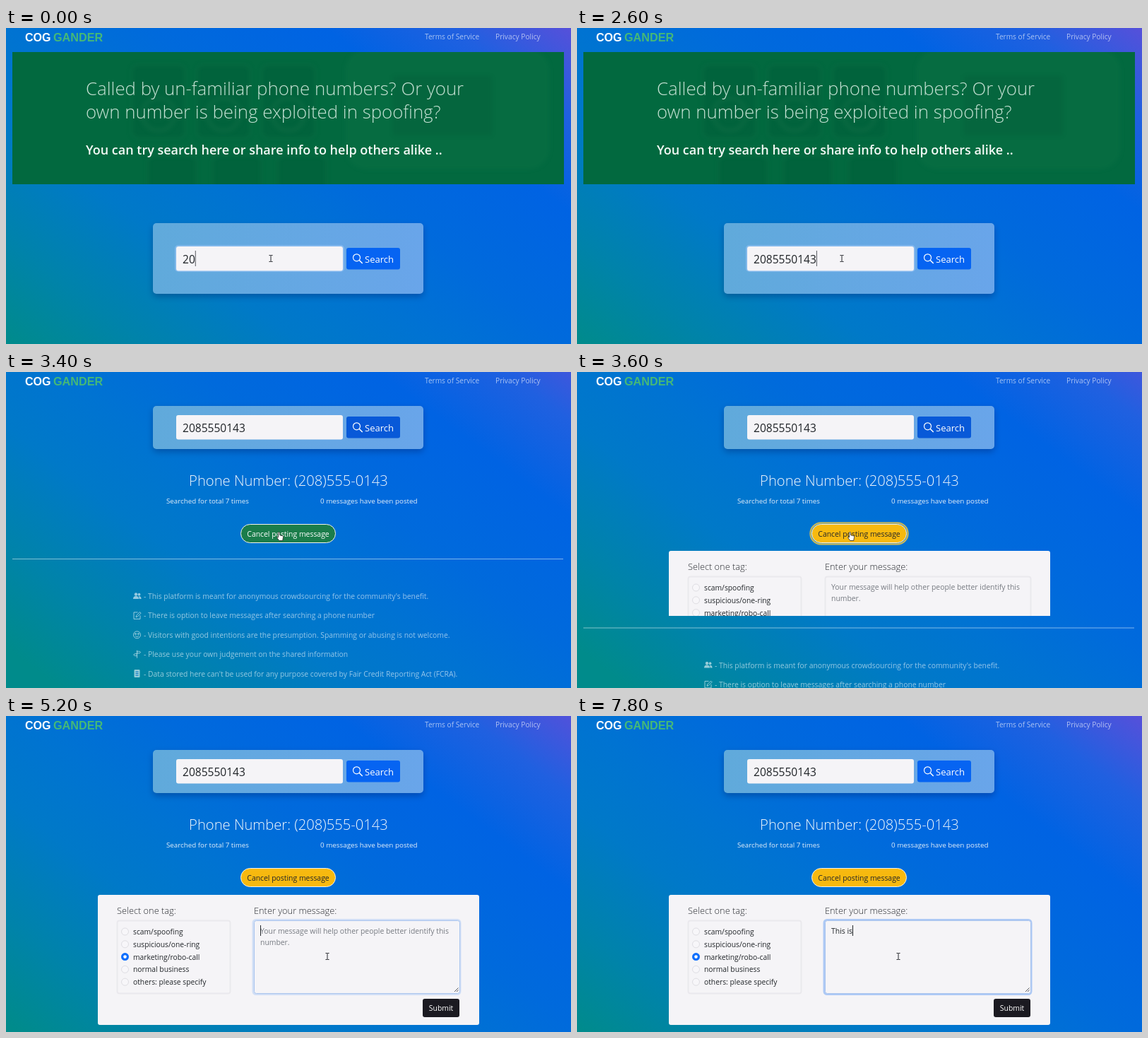
Recreate the animation shown at these times as an HTML page with a canvas. Size 800 by 447 pixels, loop 8 s.

```html
<!DOCTYPE html>
<html lang="en">
<head>
<meta charset="utf-8">
<title>Phone number search</title>
<style>
html, body { margin: 0; width: 100%; height: 100%; overflow: hidden; background: #006fd6; }
canvas { display: block; width: 800px; height: 447px; }
</style>
</head>
<body>
<canvas id="stage"></canvas>
<script>
const W = 800, H = 447, LOOP = 8000, STEP = 200;
const SANS = '"Open Sans", "Noto Sans", sans-serif';
const NUMBER = '2085550143', PRETTY = '(208)555-0143', MESSAGE = 'This is';
const INK = '#212529', PAPER = '#f5f4f7';
const RESULTS_AT = 2800, CLICK_AT = 3400;

const canvas = document.getElementById('stage');
const ctx = canvas.getContext('2d');
const dpr = window.devicePixelRatio || 1;
canvas.width = W * dpr;
canvas.height = H * dpr;

// Times at which each further character appears
const digitTimes = [0, 0, 200, 400, 600, 1000, 1200, 1800, 2000, 2200];
const letterTimes = [6400, 6600, 6800, 7000, 7200, 7600, 7800];

// Time, x, y, shape
const cursorPath = [
  [0, 375, 326, 'beam'],
  [2800, 0, 0, 'none'],
  [3000, 420, 286, 'arrow'],
  [3200, 388, 232, 'hand'],
  [3800, 340, 268, 'arrow'],
  [4000, 262, 336, 'arrow'],
  [4200, 225, 362, 'arrow'],
  [4400, 190, 348, 'arrow'],
  [4800, 170, 341, 'arrow'],
  [5000, 315, 341, 'arrow'],
  [5200, 455, 340, 'beam'],
];

const clamp = v => Math.max(0, Math.min(1, v));
const ease = v => { v = clamp(v); return v * v * (3 - 2 * v); };
const typed = (text, times, t) => text.slice(0, times.filter(k => k <= t).length);

function text(str, x, y, size, color = '#fff', weight = 400, align = 'left', family = SANS) {
  ctx.font = `${weight} ${size}px ${family}`;
  ctx.textAlign = align;
  ctx.fillStyle = color;
  ctx.fillText(str, x, y);
  return ctx.measureText(str).width;
}

function box(x, y, w, h, r, fill, stroke, line = 1) {
  ctx.beginPath();
  ctx.roundRect(x, y, w, h, r);
  if (fill) { ctx.fillStyle = fill; ctx.fill(); }
  if (stroke) { ctx.strokeStyle = stroke; ctx.lineWidth = line; ctx.stroke(); }
}

function disc(x, y, r, fill, stroke, line = 1) {
  ctx.beginPath();
  ctx.arc(x, y, r, 0, Math.PI * 2);
  if (fill) { ctx.fillStyle = fill; ctx.fill(); }
  if (stroke) { ctx.strokeStyle = stroke; ctx.lineWidth = line; ctx.stroke(); }
}

function path(d, stroke, line = 1, fill) {
  const p = new Path2D(d);
  if (fill) { ctx.fillStyle = fill; ctx.fill(p); }
  if (stroke) { ctx.strokeStyle = stroke; ctx.lineWidth = line; ctx.stroke(p); }
}

function at(x, y, draw) {
  ctx.save();
  ctx.translate(x, y);
  draw();
  ctx.restore();
}

function shadow(color, blur, dy, draw) {
  ctx.save();
  ctx.shadowColor = color;
  ctx.shadowBlur = blur * dpr;
  ctx.shadowOffsetY = dy * dpr;
  draw();
  ctx.restore();
}

function background(t) {
  const drift = t < RESULTS_AT ? 0 : 45 * (1 - ease((t - 3400) / 2600));
  // Runs from the lower left to the upper right, steeper than the diagonal
  const dx = 0.6, dy = -0.8, half = (W * dx - H * dy) / 2;
  const point = d => [W / 2 + dx * d, H / 2 + dy * d];
  const g = ctx.createLinearGradient(...point(drift - half), ...point(drift + half));
  [[0, '#008b8b'], [0.14, '#0083aa'], [0.3, '#0079c8'], [0.43, '#0073d2'],
   [0.57, '#006adc'], [0.75, '#0063e3'], [0.88, '#2060e0'], [1, '#5650da']].forEach(s => g.addColorStop(...s));
  ctx.fillStyle = g;
  ctx.fillRect(0, 0, W, H);
}

function header() {
  const arial = '"Liberation Sans", sans-serif';
  text('COG', 27, 19, 16, '#fff', 700, 'left', arial);
  text('GANDER', 67, 19, 16.2, '#45b878', 700, 'left', arial);
  text('Terms of Service', 593, 16, 10.15, 'rgba(255,255,255,.62)');
  text('Privacy Policy', 693, 16, 10.2, 'rgba(255,255,255,.62)');
}

function hero() {
  box(9, 34, 781, 187, 0, '#02693f');
  ctx.save();
  ctx.beginPath();
  ctx.rect(9, 34, 781, 187);
  ctx.clip();
  ctx.filter = 'blur(3px)';
  // Dim key caps behind the text
  const dark = 'rgba(0,50,35,.09)', pale = 'rgba(70,150,100,.13)';
  box(480, 30, 290, 170, 30, 'rgba(70,150,100,.07)');
  for (let i = 0; i < 3; i++) {
    box(178 + i * 92, 52, 76, 104, 8, dark, pale, 3);
    box(200 + i * 92, 180, 70, 50, 8, dark, pale, 3);
    disc(216 + i * 92, 122, 23, null, pale, 6);
  }
  box(548, 68, 140, 84, 4, dark);
  ctx.restore();

  const mint = '#c5e1d3';
  text('Called by un-familiar phone numbers? Or your', 113, 95, 25.84, mint, 300);
  text('own number is being exploited in spoofing?', 113, 128, 25.84, mint, 300);
  text('You can try search here or share info to help others alike ..', 113, 179, 18, '#f4faf6', 600);
}

function searchCard(y, h, inputY, value, focused, buttonColor) {
  const g = ctx.createLinearGradient(208, 0, 591, 0);
  g.addColorStop(0, '#60aadb');
  g.addColorStop(1, '#69a5ea');
  shadow('rgba(0,25,90,.35)', 10, 4, () => box(208, y, 383, h, 5, g));
  if (focused) box(240, inputY - 1, 238, 36, 4, null, 'rgba(150,195,245,.6)', 2);
  box(241, inputY, 236, 34.5, 3, PAPER);
  const w = text(value, 250, inputY + 24, 15.55, INK);
  if (focused) box(250 + w, inputY + 6, 1, 22, 0, '#55585e');
  box(482, inputY + 2, 76, 30.5, 3, buttonColor);
  disc(496.5, inputY + 15.8, 5, null, '#fff', 1.15);
  path(`M500.2 ${inputY + 19.5}l4.5 4.5`, '#fff', 1.5);
  text('Search', 508, inputY + 23, 13, '#fff');
}

const icons = [
  c => {
    disc(4, 3, 2.2, c);
    disc(8.5, 3.2, 1.9, c);
    path('M0 9.5q0-4 4-4t4 4zM8.6 9.5q0-2.4-1-3.8q4-.6 4 3.8z', null, 1, c);
  },
  c => path('M6.5 1H1v9.5h9V5.5M4 7.8l.6-2.2L9.5.6l1.6 1.6-5 5z', c),
  c => {
    disc(5.5, 5.5, 5, null, c);
    box(2, 3.2, 3, 2, 1, c);
    box(6, 3.2, 3, 2, 1, c);
    path('M3 7q2.5 2.5 5 0', c);
  },
  c => path('M5.5 0v11M5.5 1.5h3.6l1.5 1.3-1.5 1.3H5.5M5.5 5H2.2L.7 6.3l1.5 1.3h3.3', c),
  c => {
    box(1.5, 0, 8, 11, 1, c);
    path('M3.5 3h4M3.5 5.5h4M3.5 8h4', '#0074c4');
  },
];

const notes = [
  "This platform is meant for anonymous crowdsourcing for the community's benefit.",
  'There is option to leave messages after searching a phone number',
  'Visitors with good intentions are the presumption. Spamming or abusing is not welcome.',
  'Please use your own judgement on the shared information',
  "Data stored here can't be used for any purpose covered by Fair Credit Reporting Act (FCRA).",
];

function footer(shift) {
  box(9, 264 + shift, 780, 1, 0, 'rgba(255,255,255,.5)');
  const color = 'rgba(255,255,255,.58)';
  notes.forEach((note, i) => {
    const y = 321 + i * 27.4 + shift;
    at(180, y - 9.5, () => icons[i](color));
    text('- ' + note, 195, y, 10.35, color);
  });
}

function postButton(t) {
  const open = t >= CLICK_AT, yellow = t > CLICK_AT;
  const label = open ? 'Cancel posting message' : 'Post your own message';
  const half = open ? 67 : 66;
  if (yellow && t < 4800) box(397.5 - half, 213.5, half * 2 + 4, 30, 15, null, 'rgba(255,205,60,.75)', 2.5);
  box(399.5 - half, 215.5, half * 2, 26, 13, yellow ? '#f7b90f' : '#1b7d4b', '#f3f3ea');
  text(label, 399.5, 233, 10.42, yellow ? INK : '#fff', 400, 'center');
}

function radio(y, label, on) {
  if (on) {
    disc(168.5, y, 5.5, '#0d6efd');
    disc(168.5, y, 2.3, '#fff');
  } else {
    disc(168.5, y, 5, '#f7f6f9', '#dedde2');
  }
  text(label, 180, y + 4, 10.3, INK);
}

function form(t, height) {
  ctx.save();
  ctx.beginPath();
  ctx.rect(0, 253, W, height);
  ctx.clip();
  box(130, 253, 540, 184, 3, PAPER);
  text('Select one tag:', 157, 280, 12.8, '#2b2e33', 300);
  text('Enter your message:', 351, 280, 12.8, '#2b2e33', 300);

  const edge = '#eae9ed';
  box(157.5, 289.5, 160, 103, 3, null, edge, 2);
  ['scam/spoofing', 'suspicious/one-ring', 'marketing/robo-call', 'normal business', 'others: please specify']
    .forEach((label, i) => radio(305 + i * 17.8, label, i === 2 && t >= 4800));

  const focus = clamp((t - 5000) / 400);
  if (focus) box(350, 288.5, 293, 105, 4, null, `rgba(150,187,245,${0.75 * focus})`, 3);
  box(351.5, 289.5, 291, 103, 3, PAPER, focus ? '#a9c4ee' : edge, focus ? 1 : 2);
  path('M635 390l5.5-5.5M638 390l2.5-2.5', '#55565c');

  const message = typed(MESSAGE, letterTimes, t);
  let w = 0;
  if (message) {
    w = text(message, 360, 307.5, 10.4, INK);
  } else {
    text('Your message will help other people better identify this', 360, 308, 10.4, '#777b82');
    text('number.', 360, 324, 10.4, '#777b82');
  }
  if (focus) box(360 + w, 296, 1, 15, 0, INK);

  box(590, 400, 52, 26, 3, '#1b1a21');
  text('Submit', 616, 417, 10.4, '#fff', 400, 'center');
  ctx.restore();
}

const cursors = {
  none() {},
  beam() { path('M-2.5 -4.5h2l.5.5.5-.5h2M0 -4v8M-2.5 4.5h2l.5-.5.5.5h2', '#25272c'); },
  arrow() { path('M0 0v11l2.6-2.4 1.9 4.2 1.9-.9-1.9-4h3.6z', '#25272c', 0.8, '#fff'); },
  hand() {
    path('M-2.5 -5q1.2-1.2 2 0v3.8l4 .9q1.2.4 1 2l-.8 4.8h-5l-3-4.3q-.4-1.4 1.8-.3z', '#222', 0.8, '#fff');
  },
};

function cursor(t) {
  const [, x, y, kind] = cursorPath.filter(k => k[0] <= t).pop();
  at(x, y, cursors[kind]);
}

function results(t) {
  const open = ease((t - CLICK_AT) / 400);
  searchCard(48, 61, 61, NUMBER, false, t < 3800 ? '#0859d8' : '#0664f2');
  text('Phone Number: ' + PRETTY, 400, 161, 20.2, '#f2f7fd', 300, 'center');
  text('Searched for total 7 times', 227, 186, 9.78, '#e3eefa');
  text('0 messages have been posted', 445, 186, 9.83, '#e3eefa');
  footer(open * 195);
  if (open) form(t, open * 184);
  postButton(t);
}

function draw(t) {
  ctx.setTransform(dpr, 0, 0, dpr, 0, 0);
  background(t);
  header();
  if (t < RESULTS_AT) {
    hero();
    searchCard(276, 100, 309, typed(NUMBER, digitTimes, t), true, '#0664f2');
  } else {
    results(t);
  }
  cursor(t);
}

function tick() {
  const t = performance.now() % LOOP;
  draw(Math.floor(t / STEP) * STEP);
  requestAnimationFrame(tick);
}
tick();
</script>
</body>
</html>
```
